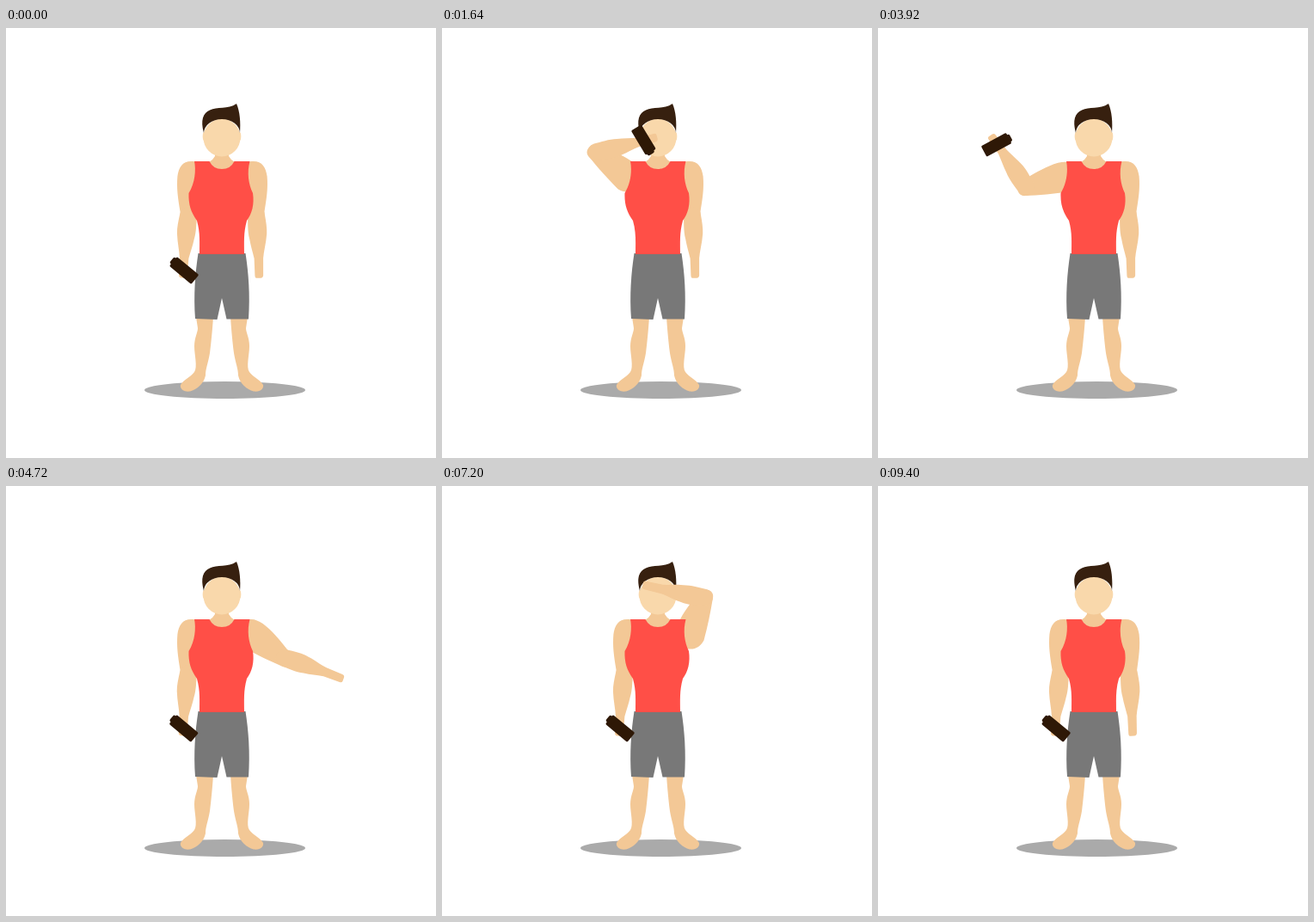
An HTML page that plays this animation: 500x500 px, repeating every 9.44 s.

```html
<!DOCTYPE html>
<html lang="en">
<head>
<meta charset="utf-8">
<title>Man with phone</title>
<style>
  html, body { margin: 0; width: 100%; height: 100%; overflow: hidden; background: #fff; }
  svg { display: block; width: 100%; height: 100%; }
  .skin { fill: #f3c896; }
  .dark { fill: #2e1806; }
</style>
</head>
<body>
<svg viewBox="0 0 500 500">
  <defs>
    <path id="leg" d="M221 336H241C240 350 239 362 237 378C235 390 232 396 232 404C230 414 222 420 214 422.500C206 423.500 202 419 203 415C206 409 215 406 219 400C223 394 219 380 219 370C219 360 223 354 223 349Z"/>
    <!-- Limbs point along +x from their joint; the outer side is -y. -->
    <path id="upper" d="M-17 0C-17 -12 -9 -16 2 -16.500C16 -16.500 28 -13.500 43 -9.700C51 -10 56 -4 56 2C56 6 53 9 49 9.500C35 13 16 17 0 19C-10 18 -17 12 -17 0Z"/>
    <path id="fore" d="M0 -10C8 -11 15 -12 22 -11.300C33 -10 42 -7 50 -6L70 -5.200Q73 -5 73 -2V2Q73 4.500 70 4.500L50 4.500C42 6 35 8 27 9C18 11 8 10 0 10A10 10 0 0 1 0 -10Z"/>
  </defs>

  <ellipse cx="254.500" cy="421" rx="93.500" ry="10" fill="#aaa"/>
  <g class="skin">
    <use href="#leg"/>
    <use href="#leg" transform="translate(502) scale(-1 1)"/>
    <path d="M243 145H259V149Q261 153 266 156Q251 174 236 156Q241 153 243 149Z"/>
  </g>
  <path fill="#787878" d="M223.500 262H278.500C282 285 284 310 282 338.500H256.500L251 314L245.500 339L220 338C218 310 220 285 223.500 262Z"/>

  <g fill="#f9d8ab">
    <ellipse cx="251" cy="127.500" rx="21.500" ry="22"/>
    <ellipse cx="230.500" cy="126" rx="1.800" ry="5"/>
    <ellipse cx="271.500" cy="126" rx="1.800" ry="5"/>
  </g>
  <path fill="#37200f" d="M230 122C226 107 229 99 237 95.500C245 91 258 95 268 88C272 97 273 110 272 122A21 16 0 0 0 230 122Z"/>

  <g transform="translate(216 172) scale(-1 1)">
    <g id="leftUpper" class="skin"><use href="#upper"/></g>
    <g id="leftFore">
      <use href="#fore" class="skin"/>
      <g id="phone" class="dark">
        <rect x="-17" y="-7" width="33" height="14" rx="1.500"/>
        <rect x="10" y="-5" width="8.500" height="9" rx="2"/>
      </g>
    </g>
  </g>
  <g transform="translate(287 172)">
    <g id="rightUpper" class="skin"><use href="#upper"/></g>
    <g id="rightFore" class="skin"><use href="#fore"/></g>
  </g>

  <path fill="#ff4f47" d="M219 155H236.500Q241 164 251 164Q261 164 265.500 155H283.500C280 168 282 182 287 192C289 205 286 216 280 224C276 238 277 250 277 263H225C225 250 226 238 222 224C215 214 212 205 212.500 192C220 180 221 165 219 155Z"/>
</svg>

<script>
const LOOP = 9440, STEP = 40, UPPER_LENGTH = 46;
// Angles in degrees; lag makes the forearm trail the upper arm.
const LEFT = { upper: [85, -37], fore: [85.3, -166], lag: 1 };
const RIGHT = { upper: [85, -67], fore: [87.6, -168], lag: 1.15 };
const PHONE = { reach: [64, 57], turn: [-125, -73] };

const part = id => document.getElementById(id);
const mix = ([a, b], p) => a + (b - a) * p;

function ease(t, start, end) {
  const x = Math.min(1, Math.max(0, (t - start) / (end - start)));
  return (1 - Math.cos(Math.PI * x)) / 2;
}

function poseArm(side, arm, p) {
  const upper = mix(arm.upper, p);
  const fore = mix(arm.fore, p ** arm.lag);
  part(side + "Upper").setAttribute("transform", `rotate(${upper})`);
  part(side + "Fore").setAttribute("transform",
    `rotate(${upper}) translate(${UPPER_LENGTH}) rotate(${fore - upper})`);
}

function draw(now) {
  const t = Math.floor((now % LOOP) / STEP) * STEP;
  const call = ease(t, 0, 1560) - ease(t, 3210, 4750);
  const lookout = Math.max(0, ease(t, 4000, 5900) - ease(t, 7600, 9500));
  poseArm("left", LEFT, Math.max(0, call));
  poseArm("right", RIGHT, lookout);
  part("phone").setAttribute("transform",
    `translate(${mix(PHONE.reach, call)}) rotate(${mix(PHONE.turn, call)})`);
}

function frame() {
  draw(performance.now());
  requestAnimationFrame(frame);
}
frame();
</script>
</body>
</html>
```
